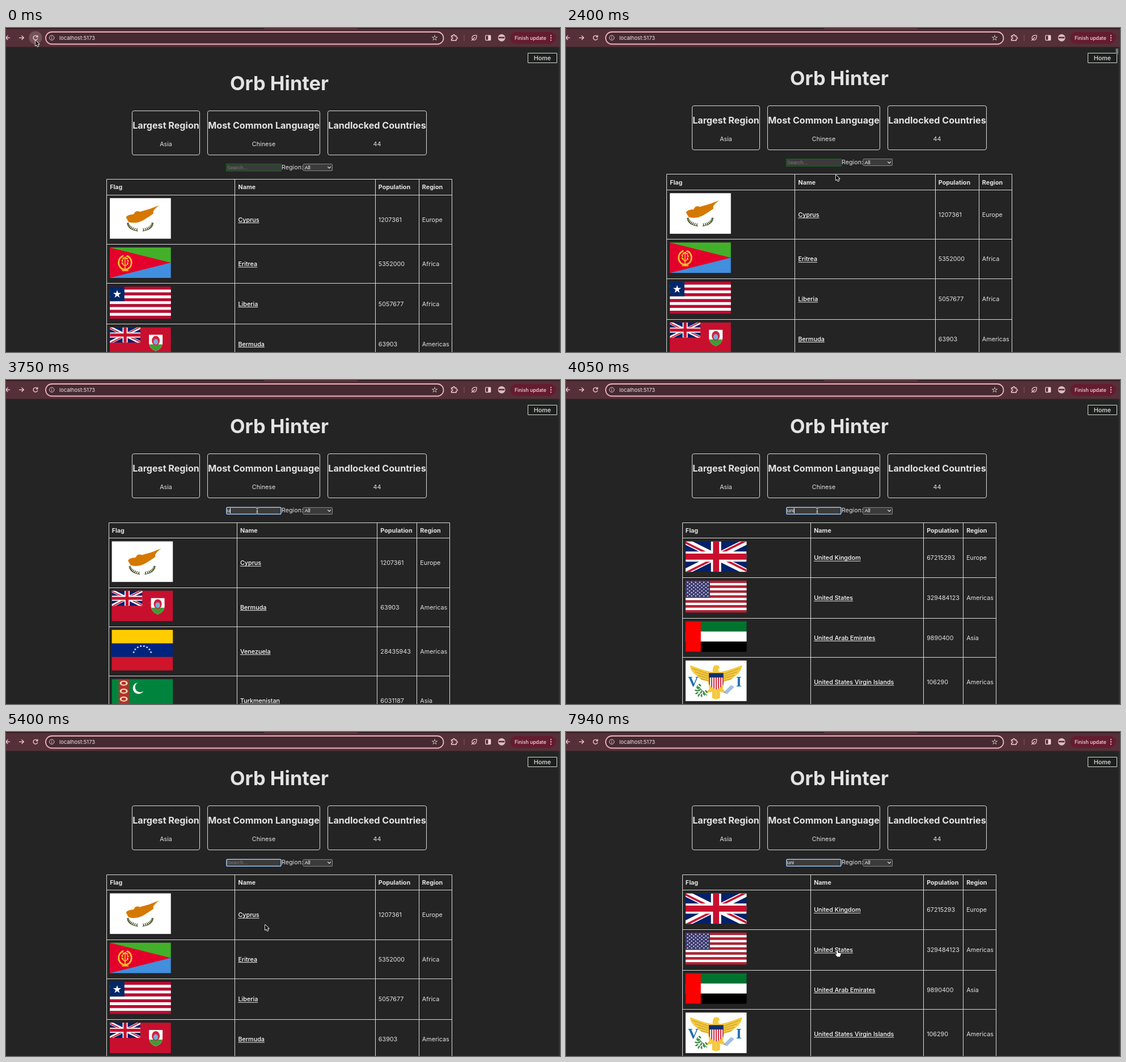
Recreate the animation shown at these times as an HTML page with a canvas. Size 977 px wide and 573 px high, loop 8 s.

```html
<!DOCTYPE html>
<html lang="en">
<head>
<meta charset="utf-8">
<title>Orb Hinter</title>
<style>
html, body { margin: 0; height: 100%; overflow: hidden; background: #242424; }
canvas { display: block; }
</style>
</head>
<body>
<canvas id="stage" width="977" height="573"></canvas>
<script>
const ctx = document.getElementById('stage').getContext('2d');
const LOOP = 8000, STEP = 150;
const EM = 10.76, PAD = 5.6, FLAG_W = 107.6, CENTER = 482;
const INTER = 'Inter, sans-serif', ARIAL = '"Liberation Sans", Arial, sans-serif';
const INK = '#e3e3e3', LINE = '#dcdcdc';

// ---- drawing helpers ----
const snap = v => Math.floor(v) + 0.5;
function rect(color, x, y, w, h) {
  ctx.fillStyle = color;
  ctx.fillRect(x, y, w, h);
}
function fill(color, d) {
  ctx.fillStyle = color;
  ctx.fill(new Path2D(d));
}
function stroke(color, width, d) {
  ctx.strokeStyle = color;
  ctx.lineWidth = width;
  ctx.stroke(new Path2D(d));
}
function disc(color, x, y, r, ry = r, turn = 0) {
  ctx.fillStyle = color;
  ctx.beginPath();
  ctx.ellipse(x, y, r, ry, turn, 0, 7);
  ctx.fill();
}
function box(x, y, w, h, r, back, edge, width = 1) {
  ctx.beginPath();
  ctx.roundRect(x, y, w, h, r);
  if (back) { ctx.fillStyle = back; ctx.fill(); }
  if (edge) { ctx.strokeStyle = edge; ctx.lineWidth = width; ctx.stroke(); }
}
function star(color, x, y, r) {
  ctx.fillStyle = color;
  ctx.beginPath();
  for (let i = 0; i < 10; i++) {
    const a = i * Math.PI / 5, q = i % 2 ? r * 0.382 : r;
    ctx.lineTo(x + q * Math.sin(a), y - q * Math.cos(a));
  }
  ctx.fill();
}
// Calls draw(x, y, angle) at n places along an elliptic arc.
function along(n, x, y, rx, ry, from, to, draw) {
  for (let i = 0; i < n; i++) {
    const a = from + (to - from) * i / (n - 1);
    draw(x + rx * Math.cos(a), y + ry * Math.sin(a), a);
  }
}
// Text is centred on y by its capital height.
function text(s, x, y, { size = EM, weight = 400, color = INK, align = 'left', family = INTER } = {}) {
  ctx.font = `${weight} ${size}px ${family}`;
  ctx.textAlign = align;
  ctx.fillStyle = color;
  ctx.fillText(s, x, y + size * 0.364);
  return ctx.measureText(s).width;
}
function at(x, y, draw) {
  ctx.save();
  ctx.translate(x, y);
  draw();
  ctx.restore();
}

// ---- flags ----
function bands(w, h, colors) {
  colors.forEach((c, i) => rect(c, 0, i * h / colors.length, w, h / colors.length));
}
function stripes(n, w, h, red) {
  bands(w, h, Array.from({ length: n }, (_, i) => i % 2 ? '#fff' : red));
}
function unionJack(w, h) {
  ctx.save();
  ctx.scale(w / 60, h / 30);
  ctx.beginPath();
  ctx.rect(0, 0, 60, 30);
  ctx.clip();
  rect('#012169', 0, 0, 60, 30);
  stroke('#fff', 6, 'M0 0L60 30M60 0L0 30');
  ctx.save();
  ctx.clip(new Path2D('M30 15h30v15zv15h-30zh-30v-15zv-15h30z'));
  stroke('#c8102e', 4, 'M0 0L60 30M60 0L0 30');
  ctx.restore();
  stroke('#fff', 10, 'M30 0V30M0 15H60');
  stroke('#c8102e', 6, 'M30 0V30M0 15H60');
  ctx.restore();
}
function cyprus(w, h) {
  rect('#fff', 0, 0, w, h);
  fill('#d57800', 'M28.5 34Q30 29 42 28.5 45 21 53 24 70 20 87 12.5 74 22 77 27 66 35 57 40 45 46 33 42z');
  const leaf = (x, y, a) => {
    disc('#4e5b31', x, y - 1.2, 2.2, 0.9, a);
    disc('#4e5b31', x, y + 1.2, 2, 0.8, a + 1.6);
  };
  along(8, 53.5, 44, 22, 13, 0.12, 1.3, leaf);
  along(8, 53.5, 44, 22, 13, 3.02, 1.84, leaf);
}
function eritrea(w, h) {
  bands(w, h, ['#43b02a', '#418fde']);
  fill('#e4002b', `M0 0L${w} ${h / 2}L0 ${h}z`);
  const leaf = (x, y, a) => disc('#ffc72c', x, y, 2.2, 1.3, a + 1);
  along(24, 26.8, 26.8, 11.3, 12.3, -1.2, 4.34, leaf);
  along(7, 26.8, 25, 5, 7, -3.6, 0.5, leaf);
  stroke('#ffc72c', 1.5, 'M26.8 17V39M21 41H33M22 29L26.8 33 32 29');
}
function liberia(w, h) {
  stripes(11, w, h, '#bf0a30');
  const c = h * 5 / 11;
  rect('#002868', 0, 0, c, c);
  star('#fff', c / 2, c / 2 + 0.5, 7.6);
}
function bermuda(w, h) {
  rect('#c8102e', 0, 0, w, h);
  unionJack(w / 2, h / 2);
  fill('#fff', 'M69 13H93V28Q92 38 81 42Q70 38 69 28z');
  fill('#3f9c35', 'M69.5 30H92.5Q91 38 81 42Q71 38 69.5 30z');
  disc('#d4213d', 81, 23.5, 7, 8.5);
  disc('#7fa8d6', 81, 25.5, 4.2, 5);
}
function usa(w, h) {
  stripes(13, w, h, '#b22234');
  const cw = w * 0.4, ch = h * 7 / 13;
  rect('#3c3b6e', 0, 0, cw, ch);
  for (let r = 0; r < 9; r++)
    for (let c = r % 2; c < 11; c += 2)
      star('#fff', (c + 1) * cw / 12, (r + 1) * ch / 10, 1.75);
}
function emirates(w, h) {
  bands(w, h, ['#00732f', '#fff', '#000']);
  rect('#f00', 0, 0, w / 4, h);
}
function virginIslands(w, h) {
  rect('#fff', 0, 0, w, h);
  const gold = '#f4c93c', mid = w / 2;
  for (const side of [-1, 1]) at(mid, 0, () => {
    ctx.scale(side, 1);
    fill(gold, 'M0 20L8 20Q24 17 46 8Q45 19 35 26L26 34 14 37 12 50 18 58 7 55V66L0 69z');
    for (let i = 0; i < 4; i++)
      stroke('#a9802b', 0.7, `M13 ${24 + i * 4}L${42 - i * 5} ${14 + i * 6}`);
  });
  fill(gold, 'M48 21Q47 8 54 8 60 8 60 14L57 15 60 21z');
  ctx.save();
  ctx.clip(new Path2D('M41 22H67V40Q66 47 54 51Q42 47 41 40z'));
  rect('#fff', 41, 22, 26, 30);
  for (let x = 41; x < 67; x += 4) rect('#c6263c', x, 28, 2, 24);
  rect('#162d6b', 41, 21, 26, 9);
  ctx.restore();
  stroke('#3c8b45', 1.3, 'M38 62L20 44');
  along(6, 29, 53, 8, 8, 0.8, 3.9, (x, y, a) => {
    disc('#3c8b45', x + 2, y - 4, 3, 1.4, a);
    disc('#3c8b45', x - 2, y + 1, 3, 1.4, a);
  });
  for (let i = 0; i < 3; i++) stroke('#4b86c2', 1.2, `M${68 + i * 2} ${57 + i}l13 -13`);
  const serif = { size: 26, weight: 700, color: '#1c70b4', align: 'center', family: '"Liberation Serif", serif' };
  text('V', 13.5, 36.5, serif);
  text('I', 94, 36.5, serif);
}
function brunei(w, h) {
  rect('#f7e017', 0, 0, w, h);
  at(0, 0, () => {
    ctx.scale(w / 144, h / 72);
    fill('#fff', 'M0 4V36L144 68V36z');
    fill('#000', 'M0 20V36L144 68V52z');
  });
  const red = '#cf1126';
  stroke(red, 3, 'M43 25Q42 38 54 38Q65 38 64 25');
  stroke(red, 2, 'M53.6 12V40M46 30Q53.6 36 61 30M39 41V27M68 41V27');
  fill(red, 'M46 21Q53.6 13 61 21zM49 30H58L56 24H51zM42 39Q53.6 45 65 39L66 43Q53.6 49 41 43z');
}
function burundi(w, h) {
  rect('#ce1126', 0, 0, w, h);
  fill('#1eb53a', `M0 0L${w / 2} ${h / 2}L0 ${h}zM${w} 0L${w / 2} ${h / 2}L${w} ${h}z`);
  ctx.beginPath();
  ctx.rect(0, 0, w, h);
  ctx.clip();
  stroke('#fff', 10, `M0 0L${w} ${h}M${w} 0L0 ${h}`);
  disc('#fff', w / 2, h / 2, h * 0.28);
}
function venezuela(w, h) {
  bands(w, h, ['#fc0', '#00247d', '#cf142b']);
  along(8, w / 2, h * 0.62, 16, 16, 3.46, 5.97, (x, y) => star('#fff', x, y, 2.3));
}
function turkmenistan(w, h) {
  rect('#00843d', 0, 0, w, h);
  rect('#b5312c', 12, 0, 18, h);
  for (let y = 7; y < h; y += 14) {
    disc('#f2d9b0', 21, y, 7, 4.5);
    disc('#b5312c', 21, y, 4, 2.5);
  }
  disc('#fff', 47, 16, 10);
  disc('#00843d', 50, 14, 9);
}

// name: [population, region, flag height / width, flag]
const countries = {
  'Cyprus': [1207361, 'Europe', 2 / 3, cyprus],
  'Eritrea': [5352000, 'Africa', 1 / 2, eritrea],
  'Liberia': [5057677, 'Africa', 10 / 19, liberia],
  'Bermuda': [63903, 'Americas', 1 / 2, bermuda],
  'Venezuela': [28435943, 'Americas', 2 / 3, venezuela],
  'Turkmenistan': [6031187, 'Asia', 2 / 3, turkmenistan],
  'United Kingdom': [67215293, 'Europe', 1 / 2, unionJack],
  'Brunei': [437483, 'Asia', 1 / 2, brunei],
  'Hungary': [9749763, 'Europe', 1 / 2, (w, h) => bands(w, h, ['#ce2939', '#fff', '#477050'])],
  'United States': [329484123, 'Americas', 10 / 19, usa],
  'United Arab Emirates': [9890400, 'Asia', 1 / 2, emirates],
  'United States Virgin Islands': [106290, 'Americas', 2 / 3, virginIslands],
  'Burundi': [11890781, 'Africa', 3 / 5, burundi]
};
// Rows in view for each query; the columns also fit the rows further down.
const results = {
  '': { nameW: 247.4, popW: 77, names: ['Cyprus', 'Eritrea', 'Liberia', 'Bermuda'] },
  u: { nameW: 247.4, popW: 70, names: ['Cyprus', 'Bermuda', 'Venezuela', 'Turkmenistan'] },
  un: { nameW: 247.4, popW: 70, names: ['United Kingdom', 'Brunei', 'Hungary', 'United States', 'Burundi'] },
  uni: { nameW: 199, popW: 70, names: ['United Kingdom', 'United States', 'United Arab Emirates', 'United States Virgin Islands'] }
};

// ---- motion ----
const FOCUS = 3300;
const bursts = [
  { start: FOCUS, words: [''] },
  { start: 3750, words: ['u', 'un', 'uni'] },
  { start: 4500, words: ['un', 'u', ''] },
  { start: 7040, words: ['un', 'uni'] }
];
const legs = [
  { from: 150, to: 1200, x: 675, y: 112, sag: 60 },
  { from: 1200, to: 1650, x: 685, y: 105 },
  { from: 1800, to: 2100, x: 476, y: 260 },
  { from: 2850, to: 3150, x: 443, y: 231 },
  { from: 4950, to: 5400, x: 457, y: 341 },
  { from: 5400, to: 6150, x: 436, y: 480 },
  { from: 6150, to: 6600, x: 426, y: 428 },
  { from: 7340, to: 7940, x: 479, y: 386 }
];
const ease = p => {
  p = Math.min(1, Math.max(0, p));
  return p * p * (3 - 2 * p);
};
function typed(t) {
  const burst = bursts.findLast(b => b.start <= t);
  if (!burst) return { query: '', since: Infinity };
  const i = Math.min(burst.words.length - 1, Math.floor((t - burst.start) / STEP));
  return { query: burst.words[i], since: burst.start + i * STEP };
}
function pointerAt(t) {
  let x = 52, y = 22;
  for (const leg of legs) {
    if (t < leg.from) break;
    const p = ease((t - leg.from) / (leg.to - leg.from));
    x += (leg.x - x) * p;
    y += (leg.y - y) * p + (leg.sag || 0) * 4 * p * (1 - p);
  }
  return [x, y];
}
function scrollAt(t) {
  return 17.5 * ease((t - 2100) / 600) - (t >= 2850 ? 2 : 0);
}
// The screen refreshes in steps, with one longer pause.
function refreshTime(t) {
  if (t >= 7040) return 7040 + Math.floor((t - 7040) / STEP) * STEP;
  return Math.min(6600, Math.floor(t / STEP) * STEP);
}

// ---- page ----
function drawCard(x, w, y, title, value) {
  box(x, snap(y + 146), w, 78, 3.4, null, LINE);
  text(title, x + w / 2, y + 172, { size: EM * 1.5, weight: 700, align: 'center' });
  text(value, x + w / 2, y + 205, { align: 'center' });
}
function drawSearch(t, y) {
  const { query, since } = typed(t);
  if (t >= FOCUS) box(389, y + 240.7, 96, 12, 1.5, '#3b3b3b', '#9cc4f2', 1.6);
  else box(388.5, y + 240.5, 97, 12.5, 0, '#3b3b3b', '#1c5a1e', 1.4);
  const small = { size: 8.97, family: ARIAL, color: '#fff' };
  const width = text(query || 'Search...', 390, y + 246.6, query ? small : { ...small, color: '#7b7b7b' });
  if (t >= since && Math.floor((t - since) / 500) % 2 === 0)
    rect('#fff', 390 + (query && width), y + 242, 1, 9.5);
  text('Region:', 486, y + 246);
  box(524, snap(y + 240.5), 51.5, 12, 1.5, '#3b3b3b', '#858585');
  text('All', 526.8, y + 246.6, small);
  stroke('#eee', 1.1, `M567.3 ${y + 245.2}l2.8 2.8 2.8-2.8`);
}
function drawTable(y, { nameW, popW, names }) {
  const widths = [226.3, nameW, popW, 58.2];
  const total = widths.reduce((a, b) => a + b);
  const cols = [CENTER - total / 2];
  widths.forEach(w => cols.push(cols.at(-1) + w));
  const rules = [y + 267.7, y + 295.3];
  ['Flag', 'Name', 'Population', 'Region'].forEach((s, i) =>
    text(s, cols[i] + PAD, rules[0] + 13.8, { weight: 700 }));
  for (const name of names) {
    const [population, region, ratio, flag] = countries[name];
    const top = rules.at(-1), h = FLAG_W * ratio, row = h + 15.5, mid = top + row / 2;
    at(cols[0] + PAD, top + PAD, () => flag(FLAG_W, h));
    const w = text(name, cols[1] + PAD, mid, { weight: 500, color: '#fff' });
    rect('#fff', cols[1] + PAD, mid + 5.3, w, 0.9);
    text(population, cols[2] + PAD, mid);
    text(region, cols[3] + PAD, mid);
    rules.push(top + row);
  }
  const across = rules.map(v => `M${snap(cols[0])} ${snap(v)}H${snap(cols[4])}`);
  const down = cols.map(x => `M${snap(x)} ${snap(rules[0])}V${snap(rules.at(-1))}`);
  stroke(LINE, 1, across.concat(down).join(''));
}
function drawToolbar(t) {
  const pink = '#f3cfd5';
  rect('#553039', 0, 0, 977, 33.5);
  rect('#2c171d', 0, 0, 455, 1.5);
  rect('#2c171d', 620, 0, 357, 1.5);
  if (t < 300) disc('#75535b', 52, 17, 11.5);
  stroke(pink, 1.3, 'M-2 17.3H7M3.5 13.5L-.5 17.3 3.5 21M23 17.3H31M27.5 13.5L31.3 17.3 27.5 21');
  stroke(pink, 1.3, 'M55.2 15A3.9 3.9 0 1 0 55.8 18.3M55.8 12.8V15.8H52.6');
  box(70, 7, 701.5, 21.5, 10.8, '#452a31', '#f2b3c0', 1.8);
  stroke(pink, 1, 'M85 17.3A4.2 4.2 0 1 1 76.6 17.3A4.2 4.2 0 1 1 85 17.3M80.8 16.8V19.6M80.8 14.7V15.7');
  text('localhost:5173', 94, 17.3, { size: 9.4, color: '#f5e4e7' });
  star(pink, 756, 17.5, 5.8);
  star('#452a31', 756, 17.5, 3.6);
  stroke(pink, 1.3, 'M785.5 14H788.2A1.7 1.7 0 1 1 791.4 14H794V16.2A1.7 1.7 0 1 1 794 19.4V22H785.5V19.4A1.7 1.7 0 1 0 785.5 16.2z');
  rect('#7d5861', 807.5, 12, 1, 11);
  stroke(pink, 1.2, 'M830 13Q822 12.5 821.8 17.5Q822 21.5 826 21.3Q830.3 20.5 830 13M821 22.2L827 16.5');
  box(845.6, 13, 9, 8.6, 1, null, pink, 1.2);
  rect(pink, 850.2, 13, 4.4, 8.6);
  disc('#e3bec3', 874, 17.3, 6.4);
  rect('#54343c', 868.8, 15.6, 10.4, 2.8);
  box(889, 7, 81, 21, 10.5, '#641c30');
  text('Finish update', 897, 17.5, { size: 8.7, weight: 500, color: '#fbd8de' });
  for (let i = -1; i <= 1; i++) disc('#fbd8de', 961, 17.4 + i * 4.1, 1.1);
}
function drawPointer(t) {
  at(...pointerAt(t), () => {
    ctx.lineJoin = 'round';
    if (t >= 3150 && t < 5100) {
      const beam = 'M-2.8-4.8Q0-4.8 0-3.2Q0-4.8 2.8-4.8M0-3.2V3.6M-2.8 5.2Q0 5.2 0 3.6Q0 5.2 2.8 5.2M-1.4 1.2H1.4';
      stroke('#222', 2.2, beam);
      stroke('#eee', 1, beam);
    } else if (t >= 7940) {
      const hand = 'M-2 1Q-1 0 0 1L1 5 5 5 6 6.5 4 11.5H-.5L-4 7.5Q-3.5 6 -1.5 7.2z';
      stroke('#111', 1.2, hand);
      fill('#fff', hand);
    } else {
      const arrow = 'M0 0V9.2L2.2 7.2 3.8 10.8 5.3 10.1 3.7 6.6H6.6z';
      stroke('#fff', 1.7, arrow);
      fill('#0a0a0a', arrow);
    }
  });
}
function draw(t) {
  const y = -scrollAt(t);
  rect('#242424', 0, 0, 977, 573);
  text('Orb Hinter', CENTER, y + 97.2, { size: EM * 3.2, weight: 700, align: 'center' });
  drawCard(222.5, 119, y, 'Largest Region', 'Asia');
  drawCard(355.5, 198, y, 'Most Common Language', 'Chinese');
  drawCard(567.5, 174, y, 'Landlocked Countries', '44');
  drawSearch(t, y);
  drawTable(y, results[typed(t).query]);
  box(920.5, 44.5, 51, 17, 0, '#1d1f1d', LINE);
  text('Home', 946, 53, { weight: 500, align: 'center' });
  if (t >= 2250 && t < 3450) box(969.5, 36, 4.5, 11, 2.2, '#757575');
  rect('#3c3c3c', 975, 33, 1, 540);
  drawToolbar(t);
  drawPointer(t);
}
function tick(now) {
  draw(refreshTime(now % LOOP));
  requestAnimationFrame(tick);
}
requestAnimationFrame(tick);
</script>
</body>
</html>
```
